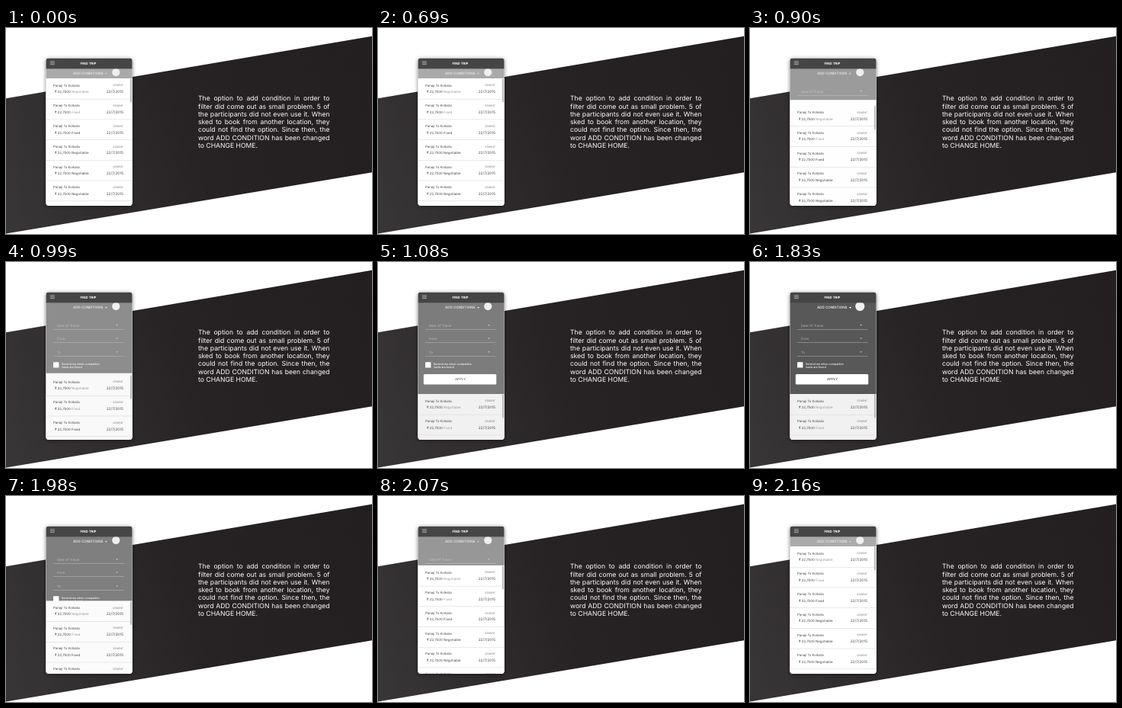
An HTML page with a canvas for the animation above (2.19 s loop, 480 by 270 pixels).

```html
<!DOCTYPE html>
<html lang="en">
<head>
<meta charset="utf-8">
<title>Find trip</title>
<style>
  html, body { margin: 0; width: 100%; height: 100%; overflow: hidden; background: #fff; }
  canvas { display: block; width: 480px; height: 270px; }
</style>
</head>
<body>
<canvas id="stage"></canvas>
<script>
const W = 480, H = 270, LOOP = 2190;
const FONT = 'Inter, "Open Sans", sans-serif';
const canvas = document.getElementById('stage');
const ctx = canvas.getContext('2d');
const dpr = window.devicePixelRatio || 1;
canvas.width = W * dpr;
canvas.height = H * dpr;

const CARD = { x: 52.3, y: 39.6, w: 113.4, h: 193.4, r: 4 };
const LIST_TOP = 66, OPEN_BY = 107, ROW = 26.7;
const COPY = [
  'The option to add condition in order to',
  'filter did come out as small problem. 5 of',
  'the participants did not even use it. When',
  'sked to book from another location, they',
  'could not find the option. Since then, the',
  'word ADD CONDITION has been changed',
  'to CHANGE HOME.'
];
const TERMS = ['Negotiable', 'Fixed', 'Fixed', 'Negotiable', 'Negotiable', 'Negotiable', 'Negotiable'];

const ramp = (t, a, b) => Math.min(1, Math.max(0, (t - a) / (b - a)));
const ease = (t, a, b) => {
  const u = ramp(t, a, b);
  return u * u * (3 - 2 * u);
};
const mix = (a, b, u) => a + (b - a) * u;
const gray = (v, a = 1) => `rgba(${v},${v},${v},${a})`;

function rect(x, y, w, h, color) {
  ctx.fillStyle = color;
  ctx.fillRect(x, y, w, h);
}

function rounded(x, y, w, h, r, color) {
  ctx.beginPath();
  ctx.roundRect(x, y, w, h, r);
  ctx.fillStyle = color;
  ctx.fill();
}

function polygon(points, color) {
  ctx.beginPath();
  points.forEach(([x, y]) => ctx.lineTo(x, y));
  ctx.closePath();
  ctx.fillStyle = color;
  ctx.fill();
}

function text(str, x, y, size, color, weight = 400, align = 'left') {
  ctx.font = `${weight} ${size}px ${FONT}`;
  ctx.textAlign = align;
  ctx.fillStyle = color;
  ctx.fillText(str, x, y);
  return ctx.measureText(str).width;
}

function caret(x, y, size, angle, color) {
  ctx.save();
  ctx.translate(x, y);
  ctx.rotate(angle);
  polygon([[-size, -size * 0.55], [size, -size * 0.55], [0, size * 0.65]], color);
  ctx.restore();
}

function justify(line, x, y, width, size, color) {
  const words = line.split(' ');
  ctx.font = `400 ${size}px ${FONT}`;
  const sizes = words.map(w => ctx.measureText(w).width);
  const gap = (width - sizes.reduce((a, b) => a + b)) / (words.length - 1);
  words.forEach((word, i) => {
    text(word, x, y, size, color);
    x += sizes[i] + gap;
  });
}

function backdrop() {
  rect(0, 0, W, H, '#fff');
  const g = ctx.createLinearGradient(0, 220, W, 60);
  g.addColorStop(0, '#383536');
  g.addColorStop(0.5, '#272324');
  g.addColorStop(1, '#231f20');
  polygon([[0, 92.2], [W, 10.8], [W, 189.2], [0, 269.4]], g);
  COPY.forEach((line, i) => {
    const y = 95.3 + i * 10.25;
    if (i < COPY.length - 1) justify(line, 252, y, 172.5, 8.65, '#fff');
    else text(line, 252, y, 8.65, '#fff');
  });
}

function field(label, y, ink) {
  text(label, 67, y, 4.3, ink);
  caret(145.5, y - 2, 1.5, 0, ink);
  rect(62, y + 3.1, 92.5, 0.5, ink);
}

function form(dark, open, press) {
  const { x, w } = CARD;
  rect(x, 53, w, 121, gray(mix(170, 84, dark)));

  text('ADD CONDITIONS', 88, 61.4, 4.5, gray(255, mix(0.8, 1, dark)), 500);
  caret(131.5, 59.8, mix(1.2, 1.7, dark), -Math.PI / 2 * (1 - open), gray(255, mix(0.75, 1, dark)));

  const ink = gray(mix(200, 180, dark));
  field('Date Of Travel', 84.9, ink);
  field('From', 102.3, ink);
  field('To', 120, ink);

  rounded(62, 131.2, 7.4, 7.4, 0.7, '#fff');
  text('Remind me when compatible', 73, 134.7, 3.6, '#f4f4f4', 500);
  text('loads are found', 73, 138.7, 3.6, '#f4f4f4', 500);
  rounded(59.8, 147, 95.4, 13.5, 1.5, '#fff');
  text('APPLY', 108, 155.4, 4.4, gray(mix(150, 70, dark)), 500, 'center');

  ctx.beginPath();
  ctx.arc(144.2, 58.1, 5.1 + press, 0, Math.PI * 2);
  ctx.fillStyle = '#efefef';
  ctx.fill();
}

// The sheet edge and the rows open on slightly different curves.
function list(open, reveal) {
  const { x, w } = CARD;
  const edge = LIST_TOP + OPEN_BY * reveal;
  const top = LIST_TOP + OPEN_BY * open;
  rect(x, edge, w, H - edge, gray(mix(255, 241, open ** 3)));
  TERMS.forEach((term, i) => {
    const y = top + i * ROW;
    text('Panaji To Kolkata', 62, y + 10.7, 4.3, '#4a4a4a');
    text('CEMENT', 154, y + 10.4, 3.3, '#777', 400, 'right');
    const used = text('₹ 22,7500 ', 64, y + 19.1, 4.4, '#444');
    text(term, 64 + used, y + 19.1, 4.4, i < 2 ? '#999' : '#444');
    text('22/7/2015', 154, y + 19.1, 4.7, '#444', 400, 'right');
    rect(x, y + ROW + 0.2, w, 0.6, '#d9d9d9');
  });
  rounded(163, top + 0.5, 1.7, 31, 0.8, '#b5b5b5');
}

function header() {
  const { x, y, w } = CARD;
  rect(x, y, w, 53.4 - y, '#454545');
  for (let i = 0; i < 3; i++) rect(57.8, 43.6 + i * 1.9, 6, 0.7, '#c8c8c8');
  text('FIND TRIP', 108, 47.5, 4.3, '#fff', 700, 'center');
}

function phone(t) {
  const { x, y, w, h, r } = CARD;
  const closed = ease(t, 1865, 2165);
  const open = ease(t, 785, 1085) - closed;
  const reveal = ease(t, 810, 1080) - closed;
  const dark = ease(t, 720, 1410) - ramp(t, 1815, 2145);
  const press = ease(t, 1620, 1800) - ease(t, 1830, 1980);

  ctx.save();
  ctx.shadowColor = 'rgba(0,0,0,.5)';
  ctx.shadowBlur = 5 * dpr;
  ctx.shadowOffsetY = 0.8 * dpr;
  rounded(x, y, w, h, r, '#fff');
  ctx.restore();

  ctx.save();
  ctx.beginPath();
  ctx.roundRect(x, y, w, h, r);
  ctx.clip();
  form(dark, open, press);
  list(open, reveal);
  header();
  ctx.restore();
}

function draw(now) {
  ctx.setTransform(dpr, 0, 0, dpr, 0, 0);
  ctx.textRendering = 'geometricPrecision';
  ctx.textBaseline = 'alphabetic';
  backdrop();
  phone((now - start) % LOOP);
}

const start = performance.now();
function tick() {
  draw(performance.now());
  requestAnimationFrame(tick);
}
tick();
</script>
</body>
</html>
```
